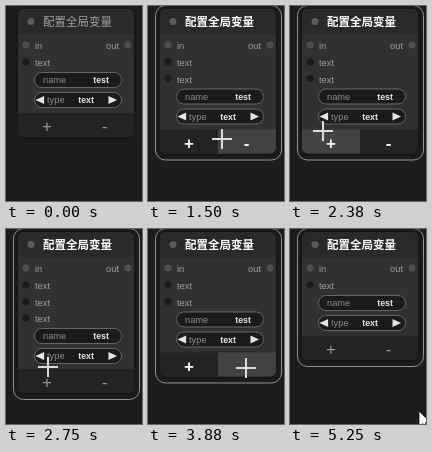
An HTML page with a canvas for the animation above (5.75 s loop, 136x195 px).

```html
<!DOCTYPE html>
<html lang="zh">
<head>
<meta charset="utf-8">
<style>
  html, body { margin: 0; width: 100%; height: 100%; overflow: hidden; background: #1d1d1d; }
  canvas { display: block; width: 136px; height: 195px; }
</style>
</head>
<body>
<canvas></canvas>
<script>
const W = 136, H = 195, LOOP = 5750, STEP = 125, ROW = 16.5;
const LEFT = 12, MIDDLE = 70, RIGHT = 128;
const canvas = document.querySelector('canvas');
const ctx = canvas.getContext('2d');
const scale = window.devicePixelRatio || 1;
canvas.width = W * scale;
canvas.height = H * scale;

const arrow = new Path2D('M0 0V16L3.8 12.5L6.5 18.5L9 17.4L6.4 11.6H11.5Z');
const added = [1125, 2500], removed = [3500, 4000];
// Pointer stops: time, x, y
const stops = [
  [250, 96, 190], [875, 47, 135], [1125, 44, 122], [1750, 90, 139], [2375, 33, 125],
  [2750, 42, 138], [3250, 85, 139], [3500, 98, 153], [4000, 98, 136], [4375, 96, 145],
  [5250, 129, 182]
];

function pointerAt(t) {
  if (t < stops[0][0]) return null;
  const next = stops.findIndex(s => s[0] > t);
  if (next < 0) return stops.at(-1).slice(1);
  const [t0, x0, y0] = stops[next - 1], [t1, x1, y1] = stops[next];
  const k = (t - t0) / (t1 - t0), eased = k * k * (3 - 2 * k);
  return [x0 + (x1 - x0) * eased, y0 + (y1 - y0) * eased];
}

function rowsAt(t) {
  const passed = times => times.filter(time => time <= t).length;
  return 1 + passed(added) - passed(removed);
}

function label(text, x, y, color, { size = 9.3, align = 'left', bold = false } = {}) {
  ctx.font = `${bold ? 700 : 400} ${size}px "Liberation Sans", "Noto Sans CJK SC", "Noto Sans CJK", sans-serif`;
  ctx.textAlign = align;
  ctx.fillStyle = color;
  ctx.fillText(text, x, y);
}

function box(x, y, w, h, r, fill, stroke) {
  ctx.beginPath();
  ctx.roundRect(x, y, w, h, r);
  if (fill) { ctx.fillStyle = fill; ctx.fill(); }
  if (stroke) { ctx.strokeStyle = stroke; ctx.lineWidth = 1; ctx.stroke(); }
}

function dot(x, y, color, r = 3.5) {
  ctx.beginPath();
  ctx.arc(x, y, r, 0, 7);
  ctx.fillStyle = color;
  ctx.fill();
}

function triangle(x, y, direction) {
  ctx.beginPath();
  ctx.moveTo(x + direction * 4.3, y);
  ctx.lineTo(x - direction * 4.3, y - 4);
  ctx.lineTo(x - direction * 4.3, y + 4);
  ctx.fillStyle = '#e4e4e4';
  ctx.fill();
}

function field(name, nameX, value, right, y) {
  box(28.5, y + 0.5, 87, 15, 7.5, '#1b1b1b', '#666');
  label(name, nameX, y + 11, '#8c8c8c');
  label(value, right, y + 11, '#e4e4e4', { size: 8.9, align: 'right', bold: true });
}

function drawButtons(top, pointer) {
  const [x, y] = pointer ?? [0, 0];
  const hover = x > LEFT && x < RIGHT && y >= top && y <= top + 28;
  const fill = active => hover && active ? '#434343' : '#232323';
  box(LEFT, top, MIDDLE - LEFT, 24, [0, 0, 0, 6], fill(x < MIDDLE));
  box(MIDDLE, top, RIGHT - MIDDLE, 24, [0, 0, 6, 0], fill(x >= MIDDLE));
  const style = { size: 17, align: 'center', bold: hover };
  label('+', 41, top + 19, hover ? '#f2f2f2' : '#999', style);
  label('-', 98.5, top + 19, hover ? '#f2f2f2' : '#999', style);
}

function drawNode(rows, selected, pointer) {
  const shift = (rows - 1) * ROW, bottom = 131 + shift;

  ctx.shadowColor = '#0008';
  ctx.shadowBlur = 4 * scale;
  box(LEFT, 3, RIGHT - LEFT, bottom - 3, 6, '#313131');
  ctx.shadowColor = 'transparent';
  box(LEFT, 3, RIGHT - LEFT, 25, [6, 6, 0, 0], '#2a2a2a');
  if (selected) box(7.5, -0.5, 126, bottom + 7, 10, null, '#929292');

  dot(25, 15.5, '#5c5c5c');
  label('配置全局变量', 37, 20, selected ? '#fff' : '#a2a2a2', { size: 11.5, bold: selected });
  dot(20, 39, '#4d5052');
  label('in', 29, 43, '#a0a0a0');
  label('out', 113, 43, '#a0a0a0', { align: 'right' });
  dot(122, 39, '#4d5052');
  for (let i = 0; i < rows; i++) {
    dot(20, 56 + i * ROW, '#1a1a1a');
    label('text', 29, 60 + i * ROW, '#a0a0a0');
  }

  field('name', 37, 'test', 103, 66 + shift);
  field('type', 41, 'text', 88, 86 + shift);
  triangle(33.8, 94 + shift, -1);
  triangle(106.8, 94 + shift, 1);
  drawButtons(bottom - 24, pointer);
}

function drawPointer([x, y], cross) {
  ctx.translate(Math.round(x), Math.round(y));
  if (cross) {
    ctx.fillStyle = '#dcdcdc';
    ctx.fillRect(-10, -1, 20, 2);
    ctx.fillRect(-1, -10, 2, 20);
  } else {
    ctx.fillStyle = '#fff';
    ctx.fill(arrow);
    ctx.strokeStyle = '#111';
    ctx.lineWidth = 0.8;
    ctx.stroke(arrow);
  }
}

function frame(now) {
  const t = Math.floor((now % LOOP) / STEP) * STEP;
  const pointer = pointerAt(t);
  const selected = t >= 1000;
  ctx.setTransform(scale, 0, 0, scale, 0, 0);
  ctx.fillStyle = '#1d1d1d';
  ctx.fillRect(0, 0, W, H);
  drawNode(rowsAt(t), selected, pointer);
  if (pointer) drawPointer(pointer, selected && t < 4625);
  requestAnimationFrame(frame);
}
requestAnimationFrame(frame);
</script>
</body>
</html>
```
